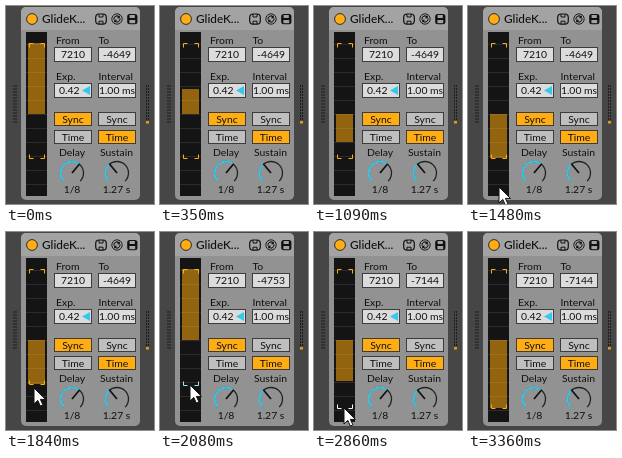
Write an HTML page that moves like this. It is 148 px wide and 198 px high and loops after 3790 ms.

```html
<!DOCTYPE html>
<html lang="en">
<head>
<meta charset="utf-8">
<title>Pitch envelope device</title>
<style>
html, body { margin: 0; width: 100%; height: 100%; overflow: hidden; background: #464646; }
svg { display: block; width: 148px; height: 198px; }
text { font: 10.4px Lato, "Open Sans", sans-serif; fill: #101010; }
.mid { text-anchor: middle; }
.name { font-size: 11.8px; font-weight: 500; }
</style>
</head>
<body>
<svg id="stage" viewBox="0 0 148 198" xmlns="http://www.w3.org/2000/svg"></svg>
<script>
const LOOP = 3790;
const ZERO = 108, TOP = 37, FLOOR = 153;
const ORANGE = '#ffad12', CYAN = '#35c8ea', INK = '#101010';
const PANEL = '#929292', HEAD = '#a3a3a3', FIELD = '#dcdcdc', OFF = '#bfbfbf';

const rect = (x, y, w, h, fill, more = '') =>
  `<rect x="${x}" y="${y}" width="${w}" height="${h}" fill="${fill}" ${more}/>`;
const path = (d, stroke, width = 1, more = '') =>
  `<path d="${d}" fill="none" stroke="${stroke}" stroke-width="${width}" ${more}/>`;
const label = (x, y, str, more = '') => `<text x="${x}" y="${y}" ${more}>${str}</text>`;
const mid = (x, y, str, id = '') => label(x, y, str, `class="mid" ${id && `id="${id}"`}`);
const box = (x, y, w, h, fill) =>
  rect(x + .5, y + .5, w - 1, h - 1, fill, 'stroke="#3c3c3c"');
const button = (x, y, w, str, on) =>
  box(x, y, w, 14, on ? ORANGE : OFF) + mid(x + w / 2, y + 10.8, str);

function handle(x) {
  let out = '';
  for (let i = 0; i < 13; i++)
    for (const dx of [0, 2]) out += rect(x + dx, 79 + i * 3, 1, 2, '#1c1c1c');
  return out;
}

function knob(cx, cy, turn) {
  const r = 11.5;
  const at = (deg, len = r) => {
    const a = deg * Math.PI / 180;
    return `${(cx + len * Math.sin(a)).toFixed(2)} ${(cy - len * Math.cos(a)).toFixed(2)}`;
  };
  const arc = (a, b) => `M${at(a)}A${r} ${r} 0 ${b - a > 180 ? 1 : 0} 1 ${at(b)}`;
  return path(arc(-135, 135), '#222', 1.3) + path(arc(-135, turn), CYAN, 1.8) +
    path(`M${cx} ${cy}L${at(turn, 12)}`, INK, 1.7);
}

function icons() {
  return rect(89.7, 8, 10.6, 10.2, 'none', `rx="3.5" stroke="${INK}" stroke-width="1.2"`) +
    path('M93 8v3h4v-3M93 18.2v-3h4v3', INK) +
    `<circle cx="111" cy="13" r="5.2" fill="none" stroke="${INK}" stroke-width=".9"/>` +
    path('M108 13.6a3 3 0 0 1 5-2.8M114 12.4a3 3 0 0 1-5 2.8', INK, 1.1) +
    `<path d="M113.8 9.2v3h-3zM108.2 16.8v-3h3z" fill="${INK}"/>` +
    rect(121.2, 8, 10.2, 10.2, INK, 'rx="2.5"') +
    rect(123.6, 9, 5.2, 3, HEAD) + rect(123.4, 14, 5.8, 3.2, HEAD);
}

// Corner ticks of the upper (dir -1) or lower (dir 1) limit.
const corners = (y, dir) =>
  `M23.5 ${y - 4 * dir}V${y}H27.5M34.5 ${y}H38.5V${y - 4 * dir}`;

function panel() {
  let grid = '';
  for (let y = 38; y < 188; y += 14) grid += rect(20, y, 21, 1, '#2b2b2b');
  return rect(0, 0, 148, 198, '#464646') + handle(7.5) + handle(140) +
    rect(7.5, 115, 3, 2.5, ORANGE, 'id="lampIn"') +
    rect(140, 115, 3, 2.5, ORANGE, 'id="lampOut"') +
    rect(15, 1, 119, 193, PANEL, 'rx="5"') +
    `<path d="M15 24V6a5 5 0 0 1 5-5H129a5 5 0 0 1 5 5V24z" fill="${HEAD}"/>` +
    `<circle cx="26" cy="13" r="5.4" fill="${ORANGE}" stroke="#2c2c2c"/>` +
    label(36, 17.2, 'GlideK...', 'class="name"') + icons() +
    rect(20, 26, 21, 164, '#141414') + grid +
    rect(22, TOP, 17, 0, '#ffa90c', 'id="bar" fill-opacity=".54"') +
    path(corners(TOP + .5, -1), ORANGE) + path(corners(FLOOR - .5, 1), ORANGE, 1, 'id="low"') +
    label(50, 37.5, 'From') + label(92.5, 37.5, 'To') +
    box(48, 41, 38, 15, FIELD) + mid(67, 52.2, '7210') +
    box(92, 41, 38, 15, FIELD) + mid(111, 52.2, '', 'to') +
    label(50, 74.3, 'Exp.') + label(92.5, 74.3, 'Interval') +
    box(48, 77, 38, 15, FIELD) + label(53, 88.2, '0.42') +
    `<path d="M76 84.5l8-4.5v9z" fill="${CYAN}"/>` +
    box(92, 77, 38, 15, FIELD) + mid(111, 88.2, '1.00 ms') +
    button(48, 106, 38, 'Sync', true) + button(48, 124, 38, 'Time', false) +
    button(92, 106, 38, 'Sync', false) + button(92, 124, 38, 'Time', true) +
    mid(66, 150, 'Delay') + mid(110.5, 150, 'Sustain') +
    knob(66, 167, 40) + knob(111, 167, -40) +
    mid(66, 187.3, '1/8') + mid(110.5, 187.3, '1.27 s') +
    `<path id="mouse" d="M0 0V16L3.8 12.4 6.3 18 8.9 16.9 6.4 11.4H11.5Z" fill="#fff"
      stroke="#111" stroke-width="1" stroke-linejoin="round"/>`;
}

const stage = document.getElementById('stage');
stage.innerHTML = panel();
const part = id => document.getElementById(id);
const bar = part('bar'), low = part('low'), to = part('to'), mouse = part('mouse');
const lampIn = part('lampIn'), lampOut = part('lampOut');

// Each note holds the bar at the top for DELAY, then sweeps it down over SUSTAIN.
const NOTES = [-43, 1850], DELAY = 250, SUSTAIN = 1270, EXPO = .42;
const DRAG = { from: 2010, to: 2690, px: 24 };

// Rows of [ms, x, y]; the drag itself is added on top.
const pointer = [[1380, 31, 199], [1480, 31, 181], [1630, 29, 168], [1740, 28, 157],
  [1840, 28, 156], [1980, 30, 152], [2900, 30, 152], [2980, 30, 155], [3200, 30, 175]];

const clamp = u => Math.min(1, Math.max(0, u));
const smooth = u => u * u * (3 - 2 * u);
const within = (t, a, b) => t >= a && t < b;

function sample(track, t, col) {
  const i = track.findIndex(row => row[0] > t);
  if (i === 0) return track[0][col];
  if (i < 0) return track[track.length - 1][col];
  const a = track[i - 1], b = track[i];
  return a[col] + (b[col] - a[col]) * (t - a[0]) / (b[0] - a[0]);
}

function draw(t) {
  const moved = Math.round(DRAG.px * smooth(clamp((t - DRAG.from) / (DRAG.to - DRAG.from))));
  const age = t - (t < NOTES[1] ? NOTES[0] : NOTES[1]);
  const sweep = clamp((age - DELAY) / SUSTAIN) ** EXPO;
  const y = Math.round(TOP + (FLOOR - 1 + moved - TOP) * sweep);
  bar.setAttribute('y', Math.min(y, ZERO));
  bar.setAttribute('height', Math.abs(y - ZERO));

  to.textContent = Math.round(-4649 - 103.94 * moved);
  low.setAttribute('transform', `translate(0 ${moved})`);
  low.setAttribute('stroke', within(t, DRAG.from, DRAG.to) ? '#9fe6fa'
    : within(t, 1940, 3020) ? '#fff' : ORANGE);

  const mx = Math.round(sample(pointer, t, 1));
  const my = Math.round(sample(pointer, t, 2)) + moved;
  mouse.setAttribute('transform', `translate(${mx} ${my})`);

  const flash = within(age, 0, 40) || within(age, 440, 640);
  lampIn.setAttribute('opacity', flash ? 1 : 0);
  lampOut.setAttribute('opacity', flash ? 1 : .85);
}

const start = performance.now();
function tick() {
  draw((performance.now() - start) % LOOP);
  requestAnimationFrame(tick);
}
tick();
</script>
</body>
</html>
```
